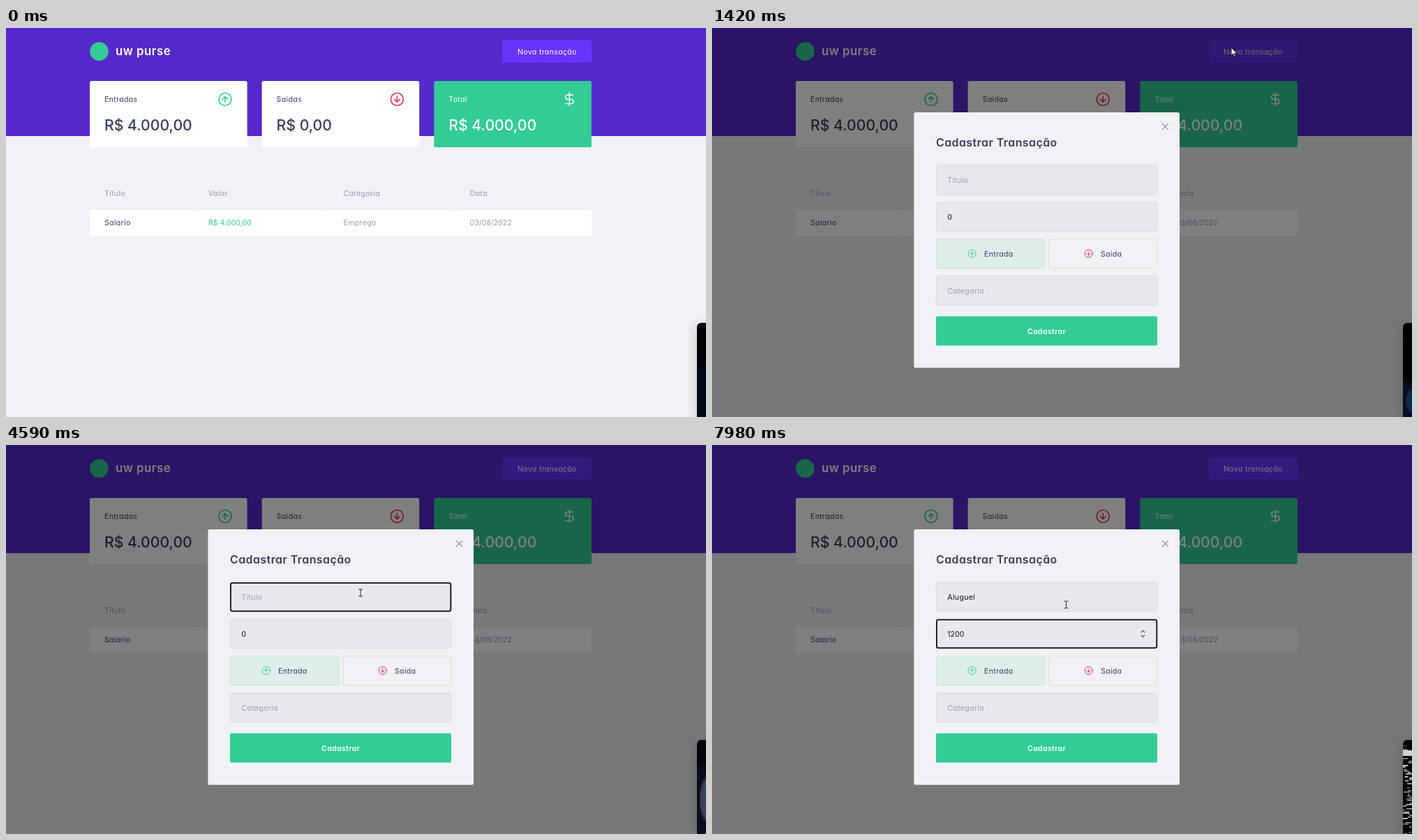
These frames come from a looping animation (1003x558 px, 8000 ms). An HTML page with a canvas:

```html
<!DOCTYPE html>
<html lang="pt-BR">
<head>
<meta charset="utf-8">
<title>Transações</title>
<style>
html, body { margin: 0; width: 100%; height: 100%; overflow: hidden; background: #f0f2f5; }
#stage { position: absolute; left: 0; top: 0; display: block; }
text { font: 400 10.6px Inter, "Open Sans", sans-serif; letter-spacing: .03em; font-feature-settings: "cv11"; fill: #363f5f; }
.num { letter-spacing: 0; }
.sum { font-size: 21.2px; font-weight: 500; letter-spacing: 0; }
.bold { font-weight: 600; }
.soft { fill: #969cb3; }
.white { fill: #fff; }
.ink { fill: #14151c; }
.green { fill: #33cc95; }
.field { fill: #e7e9ee; stroke: #d7d7d7; stroke-width: .8; }
.line { fill: none; stroke-linecap: round; stroke-linejoin: round; }
#strip { position: absolute; left: 990px; top: 423px; border-radius: 6px 0 0 0; box-shadow: 0 3px 18px rgba(0,0,0,.24); }
</style>
</head>
<body>
<svg id="stage" width="1003" height="558" viewBox="0 0 1003 558"></svg>
<canvas id="strip" width="13" height="135"></canvas>
<script>
const LOOP = 8000, STEP = 130;
const stage = document.getElementById('stage');
const ctx = document.getElementById('strip').getContext('2d');

const rect = (x, y, w, h, attrs, r = 2.6) =>
  `<rect x="${x}" y="${y}" width="${w}" height="${h}" rx="${r}" ${attrs}/>`;
const text = (x, y, s, cls = '', attrs = '') =>
  `<text x="${x}" y="${y}" class="${cls}" ${attrs}>${s}</text>`;
const arrow = (x, y, r, color, up) => {
  const a = r * .44, d = up ? -1 : 1;
  return `<g class="line" transform="translate(${x} ${y})" stroke="${color}" stroke-width="${r > 7 ? 1.6 : 1}">
    <circle r="${r}"/><path d="M0 ${-a * d}V${a * d}M${-a} 0L0 ${a * d}L${a} 0"/></g>`;
};
const card = (x, label, sum, fill, cls) =>
  rect(x, 76, 225.6, 95, `fill="${fill}"`) +
  text(x + 21, 106.3, label, cls) + text(x + 21, 146.8, sum, 'sum ' + cls);

const page =
  rect(0, 0, 1003, 558, 'fill="#f0f2f5"', 0) +
  rect(0, 0, 1003, 155, 'fill="#5429cc"', 0) +
  '<circle cx="133.5" cy="33.6" r="13.3" fill="#33cc95"/>' +
  text(157, 39.2, 'uw purse', 'bold white', 'style="font-size:16.8px"') +
  '<g id="open">' + rect(711.4, 17.5, 127.6, 32, 'fill="#6933ff"') +
  text(775.4, 37.7, 'Nova transação', 'white', 'text-anchor="middle"') + '</g>' +
  card(120, 'Entradas', 'R$ 4.000,00', '#fff', '') +
  card(366.6, 'Saidas', 'R$ 0,00', '#fff', '') +
  card(613.3, 'Total', 'R$ 4.000,00', '#33cc95', 'white') +
  arrow(313.9, 102.3, 9, '#33cc95', true) +
  arrow(560.3, 102.3, 9, '#e52e4d', false) +
  `<path class="line" transform="translate(807.3 102.3)" stroke="#fff" stroke-width="1.4"
    d="M0 -9.6V9.6M5.3 -6.3H-2.5A3.1 3.1 0 0 0 -2.5 0H2.5A3.1 3.1 0 0 1 2.5 6.3H-5.8"/>` +
  [[120, 148.6], [268.6, 193.6], [462.2, 181], [643.2, 195.8]]
    .map(([x, w]) => rect(x, 261, w, 37.4, 'fill="#fff"')).join('') +
  [[141, 'Título'], [290, 'Valor'], [483.5, 'Categoria'], [664.5, 'Data']]
    .map(([x, s]) => text(x, 240.6, s, 'soft')).join('') +
  text(141, 283.4, 'Salario') +
  text(290, 283.4, 'R$ 4.000,00', 'num green') +
  text(483.5, 283.4, 'Emprego', 'soft') +
  text(664.5, 283.4, '03/08/2022', 'num soft');

const modal =
  rect(0, 0, 1003, 558, 'fill="#000" opacity=".5"', 0) +
  rect(289.4, 121, 380.6, 366.5, 'fill="#f0f2f5"') +
  '<path class="line" stroke="#858a9c" stroke-width="1.2" d="M645.3 137.3l8.4 8.4m0-8.4l-8.4 8.4"/>' +
  text(321, 169.7, 'Cadastrar Transação', 'bold', 'style="font-size:15.9px"') +
  [197.2, 250, 355.8].map(y => rect(321.4, y, 316.4, 41.8, 'class="field"')).join('') +
  rect(321.4, 303, 155.4, 41.8, 'fill="#ddeeeb" stroke="#d7d7d7" stroke-width=".8"') +
  rect(482.6, 303, 155.2, 41.8, 'fill="none" stroke="#d7d7d7" stroke-width=".8"') +
  arrow(372.7, 323.6, 5.6, '#33cc95', true) + text(390, 327.7, 'Entrada') +
  arrow(539.8, 323.6, 5.6, '#e52e4d', false) + text(557, 327.7, 'Saida') +
  text(337.3, 380.6, 'Categoria', 'soft') +
  rect(321, 413.5, 317, 42, 'fill="#33cc95"') +
  text(479.5, 438.6, 'Cadastrar', 'bold white', 'text-anchor="middle"') +
  rect(321.9, 197.9, 315.4, 40.4, 'id="focus" fill="none" stroke="#101114" stroke-width="1.8"') +
  rect(337.3, 263, 7, 16.4, 'id="mark" fill="#338fff"', 0) +
  text(337.3, 221.9, '', '', 'id="title"') +
  text(337.3, 274.8, '0', '', 'id="value"') +
  '<path id="spin" class="line" stroke="#4a4b50" stroke-width="1.1" d="M615 268.7l2.5-2.6 2.5 2.6M615 272.7l2.5 2.6 2.5-2.6"/>' +
  '<path id="caret" d="M.6 0v15.5" stroke="#111" stroke-width="1"/>';

const cursors =
  '<path id="pointer" d="M0 0V11.2L2.6 8.8L4.3 12.6L6 11.8L4.4 8.1H8Z" fill="#fff" stroke="#000" stroke-width=".8"/>' +
  '<path id="beam" class="line" stroke="#222" stroke-width="1" d="M-2.5 -5H-.8L0 -4.4L.8 -5H2.5M0 -4.4V4.4M-2.5 5H-.8L0 4.4L.8 5H2.5"/>';

stage.innerHTML = page + `<g id="modal">${modal}</g>` + cursors;
const el = {};
stage.querySelectorAll('[id]').forEach(n => el[n.id] = n);

// [time, x, y, cursor]
const moves = [
  [0, 0, 0, ''], [510, 950, 320, 'pointer'], [640, 840, 190, 'pointer'], [770, 704, 82, 'pointer'],
  [900, 735, 40, 'pointer'], [1030, 745, 30, 'pointer'], [1160, 747, 27, 'pointer'],
  [1420, 744, 28, 'pointer'], [1550, 735, 40, 'pointer'], [1680, 640, 125, 'pointer'],
  [1810, 530, 198, 'beam'], [1940, 504, 209, 'beam'], [2070, 508, 212, 'beam'],
  [7850, 508, 218, 'beam'], [7980, 507.5, 229, 'beam']
];
const titles = [[0, ''], [5110, 'A'], [5240, 'Al'], [5370, 'Alug'], [5500, 'Alugu'], [5630, 'Alugue'], [5760, 'Aluguel']];
const values = [[0, '0'], [6940, '1'], [7070, '12'], [7200, '120'], [7330, '1200']];
const FOCUS = 1940, TAB = 6150, BLINK = 530;

// [time, upper colour, lower colour, split, glow colour, glow y, glow height]
const scenes = [
  [0, '#000', '#040716', 60, '', 0, 0],
  [510, '#000', '#050a18', 45, '#3b4358', 108, 24],
  [1030, '#020306', '#070b16', 45, '#59647c', 106, 28],
  [1420, '#010102', '#050e22', 85, '#142b56', 112, 22],
  [2470, '#020610', '#040d20', 20, '', 0, 0],
  [3010, '#030a18', '#04122c', 70, '#07224c', 50, 28],
  [3790, '#020711', '#04122c', 60, '#0c2c58', 90, 35],
  [4330, '#020409', '#07101f', 40, '#3a465c', 85, 40],
  [5240, '#000', '#05070c', 90, '#b4bed4', 77, 46],
  [6150, '#000', '#041027', 40, '#06204a', 70, 32],
  [7200, '#000', '#041027', 45, '#082852', 65, 28],
  [7720, 'noise']
];

const at = (table, t) => table.reduce((hit, row) => row[0] <= t ? row : hit);
const show = (node, on) => node.style.display = on ? '' : 'none';
const rand = n => { const v = Math.sin(n * 12.9898) * 43758.5453; return v - Math.floor(v); };

function drawNoise(seed) {
  ctx.fillStyle = '#050506';
  ctx.fillRect(0, 0, 13, 135);
  for (let y = 2; y < 135; y += 2) {
    const r = rand(y + seed), w = 2 + 8 * rand(y * 3 + seed);
    if (r < .4) continue;
    const c = y < 14 ? 70 : 110 + 145 * rand(y * 7 + seed);
    ctx.fillStyle = `rgb(${c},${c},${c})`;
    ctx.fillRect(13 * rand(y * 5 + seed) - 2, y, w, 1.5);
  }
  ctx.fillStyle = '#d8cdd2';
  ctx.fillRect(0, 15, 13, 8);
}

function drawStrip(t) {
  const [, top, low, split, glow, gy, gh] = at(scenes, t);
  if (top === 'noise') return drawNoise(t % 97);
  const g = ctx.createLinearGradient(0, split - 8, 0, split + 8);
  g.addColorStop(0, top);
  g.addColorStop(1, low);
  ctx.fillStyle = g;
  ctx.fillRect(0, 0, 13, 135);
  if (!glow) return;
  ctx.save();
  ctx.translate(14, gy);
  ctx.scale(13 / gh, 1);
  const halo = ctx.createRadialGradient(0, 0, 0, 0, 0, gh);
  halo.addColorStop(0, glow);
  halo.addColorStop(.65, glow);
  halo.addColorStop(1, 'transparent');
  ctx.fillStyle = halo;
  ctx.fillRect(-gh, -gh, 2 * gh, 2 * gh);
  ctx.restore();
  ctx.fillStyle = 'rgba(0,0,0,.22)';
  for (let y = gy - gh; y < gy + gh; y += 3) ctx.fillRect(0, y, 13, 1);
}

function draw(time) {
  const t = time < 250 ? 0 : 250 + Math.floor((time - 250) / STEP) * STEP;
  const [, x, y, kind] = at(moves, time);
  for (const id of ['pointer', 'beam']) {
    show(el[id], id === kind);
    el[id].setAttribute('transform', `translate(${x} ${y})`);
  }
  const hover = kind === 'pointer' && x > 711 && x < 839 && y > 17 && y < 50;
  el.open.style.filter = hover ? 'brightness(.9)' : '';
  show(el.modal, time >= 1420);

  const [titleTime, title] = at(titles, time), [valueTime, value] = at(values, time);
  const inValue = time >= TAB, marked = inValue && value === '0';
  el.title.textContent = title || 'Título';
  el.title.setAttribute('class', title ? 'ink' : 'soft');
  el.value.textContent = value;
  el.value.setAttribute('class', marked ? 'num white' : 'num ink');
  show(el.mark, marked);
  show(el.spin, inValue);
  show(el.focus, time >= FOCUS);
  el.focus.setAttribute('y', inValue ? 250.7 : 197.9);

  const since = time - Math.max(FOCUS, inValue ? valueTime : titleTime);
  const lit = since >= 0 && Math.floor(since / BLINK) % 2 === 0;
  show(el.caret, lit && !marked);
  if (time >= FOCUS) {
    const typed = inValue ? el.value : el.title;
    const w = inValue || title ? typed.getComputedTextLength() : 0;
    el.caret.setAttribute('transform', `translate(${337.3 + w} ${inValue ? 263 : 210})`);
  }
  drawStrip(t);
}

let start;
function frame(now) {
  start ??= now;
  draw((now - start) % LOOP);
  requestAnimationFrame(frame);
}
draw(0);
requestAnimationFrame(frame);
</script>
</body>
</html>
```
